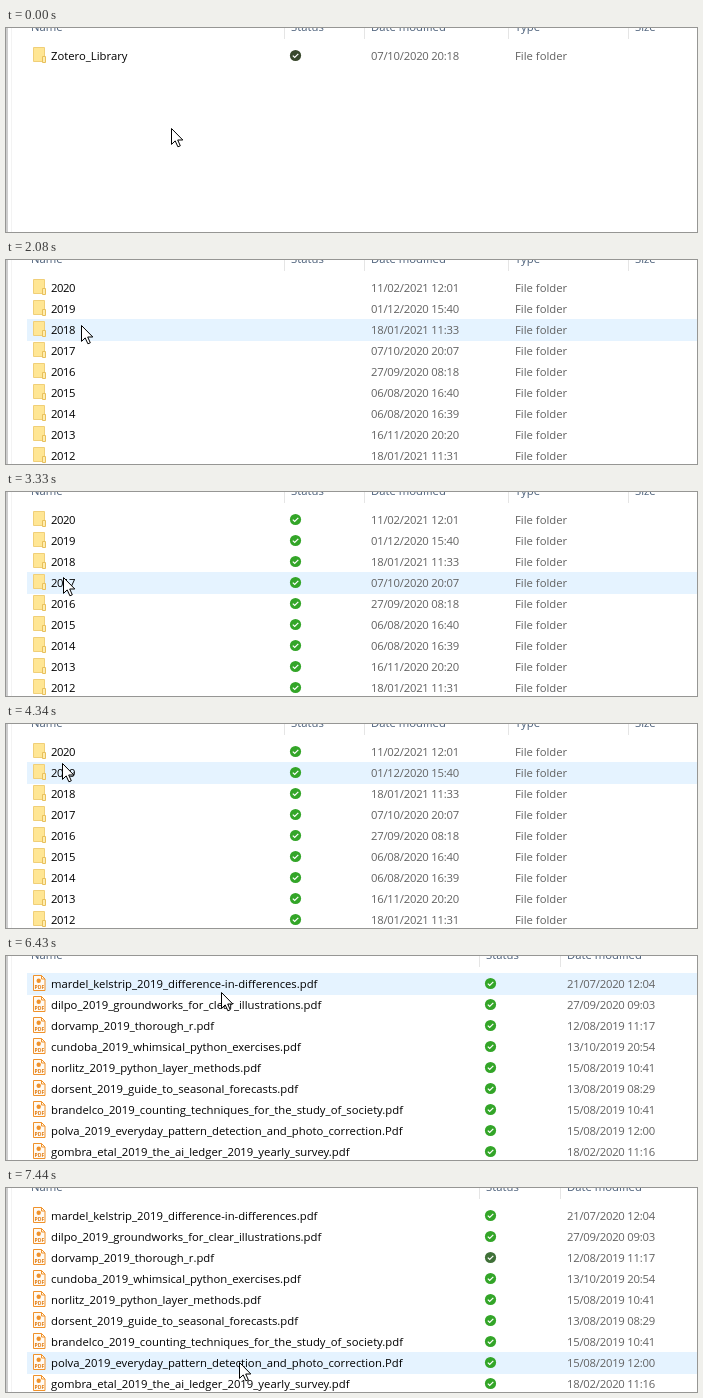
An HTML page for the animation above (7.84 s loop, 691x204 px).

```html
<!DOCTYPE html>
<html lang="en">
<head>
<meta charset="utf-8">
<title>File browser</title>
<style>
html, body { margin: 0; width: 100%; height: 100%; overflow: hidden; background: #fff; }
svg { display: block; width: 691px; height: 204px; }
text { font: 11.3px "Open Sans", "Noto Sans", sans-serif; font-variant-ligatures: none; fill: #000; white-space: pre; }
.head { fill: #4c607a; }
.info { fill: #626262; }
.date { letter-spacing: -.24px; }
.year { letter-spacing: -.45px; }
</style>
</head>
<body>
<svg viewBox="0 0 691 204">
  <defs>
    <g id="folder">
      <path d="M.5 .5H11.5V14.5H.5Z" fill="#ffe694" stroke="#f0cf78"/>
      <path d="M9.5 9.5H12.5V15.5H9.5Z" fill="#ffedb0" stroke="#e8c05c"/>
    </g>
    <g id="pdf">
      <path d="M.5 .5H8.5L12 4V15.5H.5Z" fill="#fffaf3" stroke="#f0922b"/>
      <path d="M8.5 .5V4H12" fill="none" stroke="#f0922b"/>
      <circle cx="5.7" cy="5.7" r="2.2" fill="#f0922b"/>
      <text x="1.6" y="14" style="font-size:5px;font-weight:700;fill:#e07a10">PDF</text>
    </g>
    <g id="check">
      <circle r="5.6"/>
      <path d="M-2.7 .1L-.8 2L2.8-1.7" fill="none" stroke="#fff" stroke-width="1.2"/>
    </g>
  </defs>
  <rect width="691" height="204" fill="#fff"/>
  <rect width="2" height="204" fill="#cdcdcd"/>
  <rect x="5" width="1" height="204" fill="#f3f3f3"/>
  <rect id="bar" x="21" width="672" height="22"/>
  <circle id="click" r="11" fill="#e8ec5a"/>
  <g id="views"></g>
  <path id="cursor" d="M.5 .5V16.4L4.2 12.9L6.9 18.8L9.3 17.8L6.7 12H11.8Z" fill="#fff" stroke="#000"/>
</svg>
<script>
const LOOP = 7840, TOP = 17, ROW = 21, STEP = 77;
const GREEN = "#33a528", DIM_GREEN = "#3f7038", DARK = "#39482c";
const $ = id => document.getElementById(id);

function add(parent, tag, attrs, text) {
  const el = document.createElementNS("http://www.w3.org/2000/svg", tag);
  for (const k in attrs) el.setAttribute(k, attrs[k]);
  if (text) el.textContent = text;
  return parent.appendChild(el);
}

const lines = text => text.trim().split(/\s*\n\s*/);

const years = lines(`
  11/02/2021 12:01
  01/12/2020 15:40
  18/01/2021 11:33
  07/10/2020 20:07
  27/09/2020 08:18
  06/08/2020 16:40
  06/08/2020 16:39
  16/11/2020 20:20
  18/01/2021 11:31
`).map((date, i) => `${2020 - i}|${date}`);

const papers = lines(`
  mardel_kelstrip_2019_difference-in-differences.pdf|21/07/2020 12:04
  dilpo_2019_groundworks_for_clear_illustrations.pdf|27/09/2020 09:03
  dorvamp_2019_thorough_r.pdf|12/08/2019 11:17
  cundoba_2019_whimsical_python_exercises.pdf|13/10/2019 20:54
  norlitz_2019_python_layer_methods.pdf|15/08/2019 10:41
  dorsent_2019_guide_to_seasonal_forecasts.pdf|13/08/2019 08:29
  brandelco_2019_counting_techniques_for_the_study_of_society.pdf|15/08/2019 10:41
  polva_2019_everyday_pattern_detection_and_photo_correction.Pdf|15/08/2019 12:00
  gombra_etal_2019_the_ai_ledger_2019_yearly_survey.pdf|18/02/2020 11:16
`);

const folderCols = { Name: 25, Status: 285, "Date modified": 365, Type: 509, Size: 629 };
const paperCols = { Name: 25, Status: 480, "Date modified": 561 };

function makeView(openAt, cols, rows, icon, tick) {
  const root = add($("views"), "g", {});
  for (const name in cols) {
    const x = cols[name];
    add(root, "text", { x, y: 3, class: "head" }, name);
    if (x > 25) add(root, "rect", { x: x - 7, y: 0, width: 1, height: 11, fill: "#e5e5e5" });
  }
  const list = add(root, "g", {}), status = add(root, "g", {});
  rows.forEach((row, i) => {
    const [name, date] = row.split("|"), y = TOP + ROW * i, base = y + 15;
    add(list, "use", { href: "#" + icon, x: 27, y: y + 2 });
    add(list, "text", { x: 45, y: base, class: /^\d+$/.test(name) ? "year" : "" }, name);
    add(list, "text", { x: cols["Date modified"], y: base, class: "info date" }, date);
    if (cols.Type) add(list, "text", { x: cols.Type, y: base, class: "info" }, "File folder");
    add(status, "use", { href: "#check", x: cols.Status + 4.5, y: y + 10.5, fill: tick });
  });
  return { openAt, root, list, status, count: rows.length };
}

// The first view is long open when the loop starts
const views = [
  makeView(-1000, folderCols, ["Zotero_Library|07/10/2020 20:18"], "folder", DARK),
  makeView(1770, folderCols, years, "folder", GREEN),
  makeView(4950, paperCols, papers, "pdf", GREEN)
];
// Delays after a view opens, and the click that comes before
const LIST = 150, BAR = 300, STATUS = 390, CLICK = 240, FLASH = 75;

// Pointer moves: first step, last step, end x, end y
const moves = [
  [380, 1070, 76, 31],
  [2000, 2080, 75, 65],
  [2155, 2310, 84, 104],
  [2630, 3020, 52, 36],
  [3098, 3330, 57, 85],
  [3790, 3940, 56, 49],
  [4260, 4340, 56, 39],
  [5740, 5970, 92, 32],
  [6120, 6430, 215, 36],
  [6510, 6890, 226, 137],
  [6970, 7204, 232, 187],
  [7282, 7440, 233, 174]
];

const show = (el, on) => el.setAttribute("visibility", on ? "visible" : "hidden");

function pointer(t) {
  let x = 165, y = 100;
  for (const [start, end, x1, y1] of moves) {
    if (t < start) break;
    const count = Math.round((end - start) / STEP) + 1;
    const p = Math.min(1, Math.floor((t - start + 5) / STEP + 1) / count);
    const e = p * p * (3 - 2 * p);
    x += (x1 - x) * e;
    y += (y1 - y) * e;
  }
  return [Math.round(x), Math.round(y)];
}

function draw(t) {
  const [x, y] = pointer(t);
  const view = views.filter(v => v.openAt <= t).pop();
  const age = t - view.openAt;
  for (const v of views) {
    show(v.root, v === view);
    show(v.list, v === view && age >= LIST);
    show(v.status, v === view && age >= STATUS);
  }
  views[2].status.children[2].setAttribute("fill", t < 6700 ? GREEN : DIM_GREEN);

  const next = views[views.indexOf(view) + 1];
  const held = next ? t - next.openAt + CLICK : -1;
  const picked = held >= 0;
  const row = Math.floor((y - TOP) / ROW);
  const edge = picked ? .5 : 0;
  const bar = $("bar");
  show(bar, age >= BAR && row >= 0 && row < view.count);
  bar.setAttribute("x", 21 + edge);
  bar.setAttribute("y", TOP + ROW * row + edge);
  bar.setAttribute("height", ROW + 1 - edge * 2);
  bar.setAttribute("fill", picked ? "#cce8ff" : "#e5f3ff");
  bar.setAttribute("stroke", picked ? "#99d1ff" : "none");

  const place = `translate(${x} ${y})`;
  $("click").setAttribute("transform", place);
  show($("click"), picked && held < FLASH);
  $("cursor").setAttribute("transform", place);
}

const began = performance.now();
function tick() {
  draw((performance.now() - began) % LOOP);
  requestAnimationFrame(tick);
}
tick();
</script>
</body>
</html>
```
